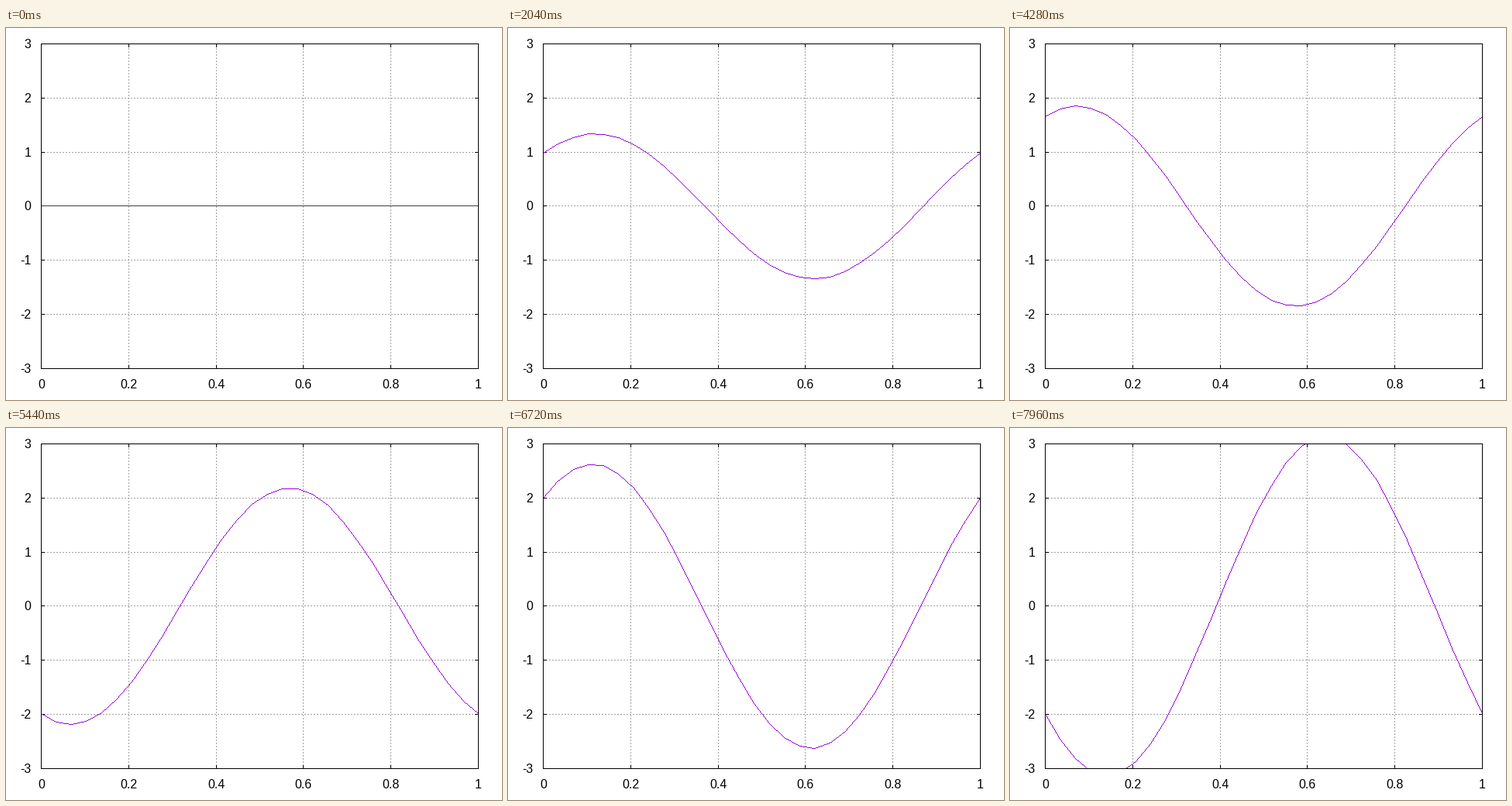
A matplotlib script for the animation above (8 s loop, 640 by 480 pixels).

```python
import numpy as np
import matplotlib.pyplot as plt
from matplotlib.animation import FuncAnimation

W, H, DPI = 640, 480, 100
FRAMES, INTERVAL = 200, 40
LEFT, RIGHT, TOP, BOTTOM = 45, 609, 20, 439
YMAX = 3
TICK = 5
BLACK, GRID, FLAT, CURVE = (0, 0, 0), (160, 160, 160), (64, 64, 64), (148, 0, 211)

# Forward-time centred-space advection of one sine: it drifts and grows.
POINTS = 30
STEP = 0.5 * np.sin(2 * np.pi / (POINTS - 1))
GROWTH = np.hypot(1, STEP)
SHIFT = np.arctan(STEP)
xs = np.linspace(0, 1, POINTS)


def px(x):
    return np.floor(LEFT + (RIGHT - LEFT) * np.asarray(x) + 0.5).astype(int)


def py(y):
    scale = (BOTTOM - TOP) / (2 * YMAX)
    up = H - 1 - BOTTOM + (np.asarray(y) + YMAX) * scale
    return H - 1 - np.floor(up + 0.5).astype(int)


XTICKS = [0, 0.2, 0.4, 0.6, 0.8, 1]
YTICKS = range(-YMAX, YMAX + 1)


def background():
    img = np.full((H, W, 3), 255, np.uint8)
    across = np.arange(LEFT, RIGHT + 1)
    down = np.arange(TOP, BOTTOM + 1)
    across = across[(across - LEFT) % 4 < 2]
    down = down[(BOTTOM - down) % 4 < 2]
    for y in py(YTICKS):
        img[y, across] = GRID
    for x in px(XTICKS):
        img[down, x] = GRID
    for y in py(YTICKS):
        img[y, LEFT:LEFT + TICK] = BLACK
        img[y, RIGHT - TICK + 1:RIGHT + 1] = BLACK
    for x in px(XTICKS):
        img[TOP:TOP + TICK, x] = BLACK
        img[BOTTOM - TICK + 1:BOTTOM + 1, x] = BLACK
    return img


def border(img):
    img[[TOP, BOTTOM], LEFT:RIGHT + 1] = BLACK
    img[TOP:BOTTOM + 1, [LEFT, RIGHT]] = BLACK


def polyline(img, x, y, color):
    """One-pixel line without smoothing, clipped to the plot box."""
    for x0, y0, x1, y1 in zip(x[:-1], y[:-1], x[1:], y[1:]):
        n = max(abs(x1 - x0), abs(y1 - y0)) + 1
        cols = np.floor(np.linspace(x0, x1, n) + 0.5).astype(int)
        rows = np.floor(np.linspace(y0, y1, n) + 0.5).astype(int)
        ok = (rows >= TOP) & (rows <= BOTTOM)
        img[rows[ok], cols[ok]] = color


def wave(n):
    if n == 0:
        return np.zeros(POINTS)
    return GROWTH ** n * np.sin(2 * np.pi * xs - SHIFT * n)


def render(n):
    img = base.copy()
    polyline(img, px(xs), py(wave(n)), CURVE if n else FLAT)
    border(img)
    return img


base = background()
fig = plt.figure(figsize=(W / DPI, H / DPI), dpi=DPI, facecolor="white")
ax = fig.add_axes([0, 0, 1, 1])
ax.axis("off")
picture = ax.imshow(render(0), interpolation="nearest", aspect="auto")
ax.set_xlim(-0.5, W - 0.5)
ax.set_ylim(H - 0.5, -0.5)

font = dict(family="Liberation Sans", size=16 * 72 / DPI, color="black", va="baseline")
for v in YTICKS:
    ax.text(32, py(v) + 5.5, str(v), ha="right", **font)
for v in XTICKS:
    ax.text(px(v), 464.5, f"{v:g}", ha="center", **font)


def update(n):
    picture.set_data(render(n))
    return [picture]


anim = FuncAnimation(fig, update, frames=FRAMES, interval=INTERVAL,
                     repeat=True, repeat_delay=0, blit=False)
plt.show()
```
